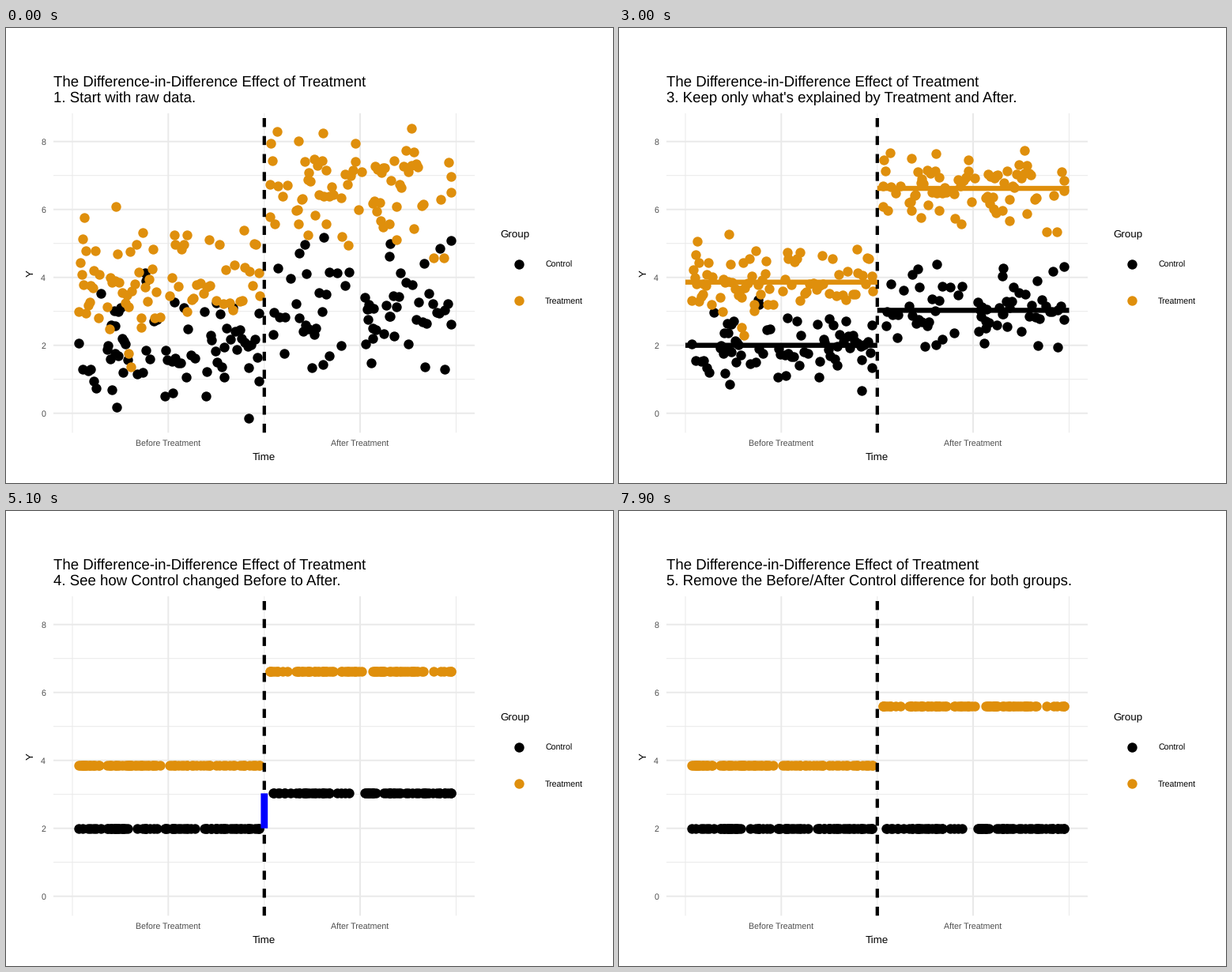
A matplotlib script that plays this animation: 768x576 px, repeating every 8 s.

```python
import numpy as np
import matplotlib.pyplot as plt
from matplotlib.animation import FuncAnimation

plt.rcParams.update({
    "font.family": "Liberation Sans",
    "text.hinting": "none",
    "toolbar": "None",
})

W, H, DPI = 768, 576, 96
FRAMES, INTERVAL = 80, 100
PX = 72 / DPI
BLACK, ORANGE, GRID = "black", "#DF8F0C", "#E9E9E9"
LEFT, RIGHT, TOP, BOTTOM = 60, 593, 108, 512.3
X_MIN, X_BEFORE, X_MID, X_AFTER, X_MAX = 84, 205.3, 326.8, 448, 569.5
DOT = (12.4 * PX) ** 2

SUBTITLES = {
    0: "1. Start with raw data.",
    5: "2. Explain Y using Treatment and After.",
    26: "3. Keep only what's explained by Treatment and After.",
    47: "4. See how Control changed Before to After.",
    68: "5. Remove the Before/After Control difference for both groups.",
}


def y_px(value):
    return 487.7 - 43 * value


MEANS = {
    "control_before": y_px(2.0),
    "control_after": y_px(3.03),
    "treated_before": y_px(3.86),
    "treated_after": y_px(6.62),
}
GAP = MEANS["control_before"] - MEANS["control_after"]

# Points at the edge of each cloud; the dense middle is random.
EDGES = {
    "control_before": [
        (114, 456), (140, 479.5), (253, 466), (307, 493.5), (201, 466),
        (211, 462), (228, 442), (166, 438), (148, 435.5), (176, 310),
        (177, 320), (119.5, 336), (92, 399), (134, 458), (266, 348),
        (213, 347), (320, 361), (276, 442)],
    "control_after": [
        (402, 265), (486, 273), (378, 274), (371, 284.5), (484.5, 289),
        (563, 269), (549, 279), (343.5, 304), (380, 311), (529, 298),
        (352, 412), (400.5, 426), (387, 430), (461.5, 424), (529.5, 429),
        (554.5, 432), (338, 388), (409, 415)],
    "treated_before": [
        (99, 240), (139, 226), (97, 267), (101, 282), (158, 428.5),
        (155, 412), (171, 379), (173, 259), (213, 262), (229, 262),
        (257, 268), (301, 256), (313.5, 273), (131, 381), (92, 359),
        (186, 280), (157, 283), (320.5, 339)],
    "treated_after": [
        (343, 131), (401, 132.5), (513, 126.5), (335, 146), (369.5, 143),
        (442, 146), (334, 239), (382, 262), (433, 275), (425, 264),
        (494, 267.5), (477, 252), (516, 254), (541, 291), (554, 291),
        (559.5, 170), (563, 208), (337, 167.5)],
}

# x start, x end and number of random points
SPANS = {
    "control_before": [(98, 112, 4), (128, 153, 14), (174, 190, 5),
                       (201, 238, 10), (252, 320, 23)],
    "control_after": [(338, 360, 4), (367, 410, 11), (418, 435, 4),
                      (453, 468, 10), (479, 499, 9), (505, 563, 14)],
    "treated_before": [(94, 118, 12), (128, 194, 22), (206, 257, 14),
                       (265, 320, 14)],
    "treated_after": [(334, 356, 5), (366, 414, 20), (425, 450, 8),
                      (463, 480, 10), (485, 528, 15), (549, 562, 2)],
}


def cloud(name, rng):
    xs = np.concatenate([np.linspace(a, b, n) for a, b, n in SPANS[name]])
    xs += rng.uniform(-1.2, 1.2, len(xs))
    ys = MEANS[name] + np.clip(rng.normal(0, 28, len(xs)), -48, 45)
    return np.vstack([EDGES[name], np.column_stack([xs, ys])])


def ease(frame, start, steps=12):
    p = np.clip((frame - start) / steps, 0, 1)
    return (1 - np.cos(np.pi * p)) / 2


fig = plt.figure(figsize=(W / DPI, H / DPI), dpi=DPI, facecolor="white")
ax = fig.add_axes([0, 0, 1, 1])
ax.set(xlim=(0, W), ylim=(H, 0))
ax.axis("off")


def line(xs, ys, width, color, z, **kw):
    kw.setdefault("solid_capstyle", "butt")
    return ax.plot(xs, ys, lw=width * PX, color=color, zorder=z,
                   snap=False, **kw)[0]


def label(x, y, text, size, color="black", **kw):
    return ax.text(x, y, text, fontsize=size, color=color, **kw)


def draw_grid():
    for value in range(9):
        y, major = y_px(value), value % 2 == 0
        line([LEFT, RIGHT], [y, y], 1.94 if major else 0.97, GRID, 1)
        if major:
            label(50, y + 4, str(value), 8, "#4D4D4D", ha="right")
    for x in (X_MIN, X_MID, X_MAX):
        line([x, x], [TOP, BOTTOM], 0.97, GRID, 1)
    for x, text in ((X_BEFORE, "Before Treatment"), (X_AFTER, "After Treatment")):
        line([x, x], [TOP, BOTTOM], 1.94, GRID, 1)
        label(x, 530.3, text, 8, "#4D4D4D", ha="center")


def draw_labels():
    label(59.5, 74, "The Difference-in-Difference Effect of Treatment", 14)
    label(326.5, 547, "Time", 10, ha="center")
    label(31, 310.5, "Y", 10, rotation=90, ha="center", va="center")
    label(625.5, 264, "Group", 10)
    for y, text, color in ((298.5, "Control", BLACK), (344.7, "Treatment", ORANGE)):
        ax.scatter([648.5], [y], s=DOT, color=color, linewidths=0)
        label(682, y + 4.3, text, 8)


draw_grid()
draw_labels()
subtitle = label(59.5, 94.2, "", 14)

rng = np.random.default_rng(12)
raw, dots, mean_lines = {}, {}, []
for name, mean in MEANS.items():
    color = BLACK if name.startswith("control") else ORANGE
    ends = [X_MIN, X_MID] if name.endswith("before") else [X_MID, X_MAX]
    raw[name] = cloud(name, rng)
    dots[name] = ax.scatter(*raw[name].T, s=DOT, color=color, linewidths=0,
                            zorder=3 if color == BLACK else 4)
    mean_lines.append(line(ends, [mean, mean], 6.4, color, 6))

dash = 4 * 2.845 / 4.27
line([X_MID, X_MID], [BOTTOM, TOP], 4.27, BLACK, 5,
     linestyle=(0, (dash, dash)), dash_capstyle="butt")
gap_bar = line([X_MID, X_MID], [0, 0], 8.8, "blue", 7)


def update(frame):
    subtitle.set_text(SUBTITLES[max(k for k in SUBTITLES if k <= frame)])
    squeeze, drop = ease(frame, 25), GAP * ease(frame, 67)
    for name, mean in MEANS.items():
        x, y = raw[name].T
        shift = drop if name.endswith("after") else 0
        dots[name].set_offsets(
            np.column_stack([x, y + (mean - y) * squeeze + shift]))
    for mean_line in mean_lines:
        mean_line.set_visible(9 <= frame < 47)
    gap_bar.set_ydata([MEANS["control_before"], MEANS["control_after"] + drop])
    gap_bar.set_visible(51 <= frame < FRAMES - 1)
    return [subtitle, gap_bar, *mean_lines, *dots.values()]


anim = FuncAnimation(fig, update, frames=FRAMES, interval=INTERVAL,
                     repeat=True, repeat_delay=0, blit=False)
plt.show()
```
